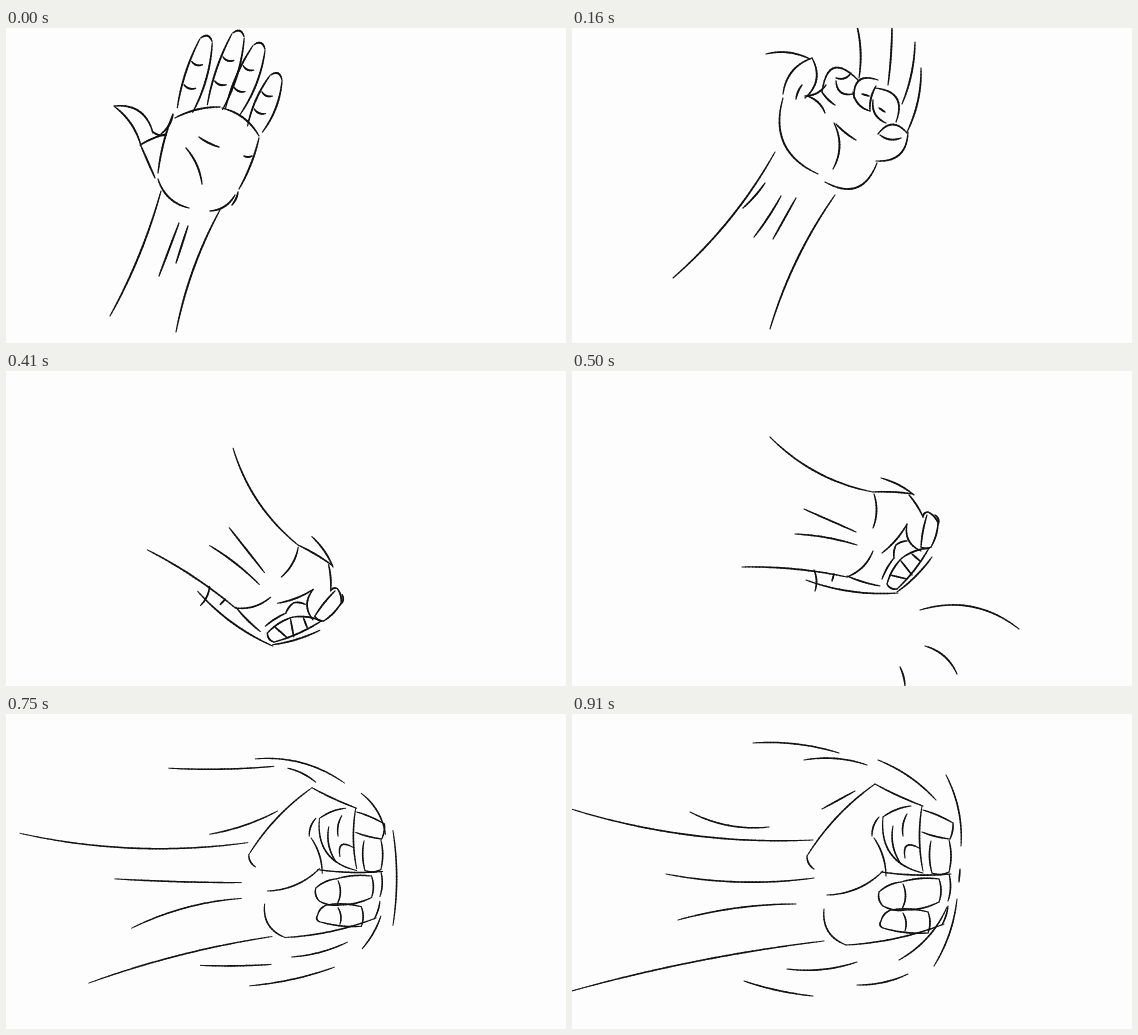
An HTML page with a canvas for the animation above (1000 ms loop, 560 by 315 pixels).

```html
<!DOCTYPE html>
<html lang="en">
<head>
<meta charset="utf-8">
<title>Punch</title>
<style>
html, body { margin: 0; width: 100%; height: 100%; overflow: hidden; background: #fdfdfd; }
canvas { display: block; width: 560px; height: 315px; }
</style>
</head>
<body>
<canvas id="stage" width="560" height="315"></canvas>
<script>
const ctx = document.getElementById('stage').getContext('2d');
const mix = (a, b, t) => a + (b - a) * t;
let weight = 1.7;

// Tapered brush stroke that bows to the left of its direction.
function arc(x1, y1, x2, y2, bow = 0) {
  const len = Math.hypot(x2 - x1, y2 - y1);
  const cx = (x1 + x2) / 2 + 2 * bow * (y2 - y1) / len;
  const cy = (y1 + y2) / 2 - 2 * bow * (x2 - x1) / len;
  const steps = Math.ceil(len / 4) + 3;
  let x = x1, y = y1;
  for (let i = 1; i <= steps; i++) {
    const t = i / steps;
    const nx = mix(mix(x1, cx, t), mix(cx, x2, t), t);
    const ny = mix(mix(y1, cy, t), mix(cy, y2, t), t);
    ctx.lineWidth = weight * (0.5 + 0.5 * Math.sqrt(Math.sin(Math.PI * (i - 0.5) / steps)));
    ctx.beginPath();
    ctx.moveTo(x, y);
    ctx.lineTo(nx, ny);
    ctx.stroke();
    [x, y] = [nx, ny];
  }
}

// Joined strokes with the same bow.
function chain(bow, ...p) {
  for (let i = 0; i + 3 < p.length; i += 2) arc(p[i], p[i + 1], p[i + 2], p[i + 3], bow);
}

// Stretched finger from base to tip, with two joint creases.
function finger(bx, by, tx, ty) {
  const len = Math.hypot(tx - bx, ty - by);
  const at = (t, side) => {
    const w = side * mix(8, 6.5, t);
    return [mix(bx, tx, t) - w * (ty - by) / len, mix(by, ty, t) + w * (tx - bx) / len];
  };
  arc(...at(0, -1), ...at(1, -1), 3);
  arc(...at(0, 1), ...at(1, 1), -4);
  arc(...at(1.02, -0.9), ...at(1.02, 0.9), 4);
  for (const t of [0.33, 0.67]) arc(...at(t, -1.1), ...at(t, 0.5), -2);
}

function openHand() {
  finger(179, 82, 200, 13);
  finger(209, 79, 232, 8);
  finger(227, 83, 253, 20);
  finger(249, 101, 270, 50);
  // thumb
  arc(108, 78, 147, 105, 10);
  arc(109, 79, 135, 118, 4);
  arc(134, 117, 160, 106, 1);
  arc(146, 103, 160, 107, -2);
  arc(167, 87, 155, 106, 2);
  // palm
  arc(135, 118, 149, 150);
  arc(167, 86, 152, 145, -2);
  arc(152, 151, 183, 180, -6);
  arc(204, 183, 229, 167, -4);
  arc(169, 90, 214, 79, 3);
  arc(216, 80, 253, 108, 5);
  arc(253, 110, 233, 161, 2);
  arc(232, 164, 226, 177, 1);
  arc(238, 128, 246, 128, -1);
  arc(193, 109, 213, 119, -1);
  arc(180, 120, 196, 156, 3);
  // arm
  arc(155, 163, 104, 288, 4);
  arc(214, 182, 170, 304, -5);
  arc(173, 195, 153, 248);
  arc(182, 198, 170, 235);
}

function curling() {
  // thumb and palm
  arc(194, 26, 238, 31, 4);
  arc(211, 66, 240, 30, 7);
  arc(240, 30, 233, 70, 8);
  arc(233, 68, 254, 57, -3);
  arc(230, 57, 224, 71, -1);
  arc(235, 68, 253, 85, 3);
  arc(211, 70, 246, 146, -18);
  arc(262, 95, 261, 141, 6);
  arc(264, 96, 284, 112, -1);
  arc(336, 104, 304, 133, 11);
  arc(305, 135, 253, 154, 16);
  // fingers
  arc(250, 64, 286, 52, 19);
  arc(264, 50, 279, 45, -3);
  arc(264, 53, 281, 66, -6);
  arc(250, 64, 263, 77, -1);
  arc(282, 70, 306, 52, 11);
  arc(281, 64, 298, 83, -4);
  arc(298, 83, 304, 58, 2);
  arc(290, 66, 297, 68);
  arc(303, 60, 324, 94, 13);
  arc(301, 72, 314, 95, -5);
  arc(307, 80, 313, 84);
  arc(306, 106, 335, 105, 9);
  arc(308, 107, 329, 110, -3);
  // trails
  arc(284, -6, 287, 50, 3);
  arc(320, -4, 316, 57, 1);
  arc(343, 14, 330, 76, 3);
  arc(349, 40, 335, 104, 4);
  // arm
  arc(203, 124, 101, 250, 7);
  arc(193, 155, 171, 180, 1);
  arc(209, 168, 182, 209, 1);
  arc(224, 170, 201, 211);
  arc(263, 167, 198, 301, -6);
}

function swing() {
  // trails
  arc(250, 122, 287, 120, 3);
  arc(285, 81, 315, 121, 4);
  arc(337, 85, 333, 126, 3);
  arc(368, 96, 354, 132, 1);
  arc(382, 121, 364, 156, 2);
  arc(390, 148, 370, 184, 2);
  arc(223, 178, 265, 131, 5);
  arc(372, 183, 358, 198, 2);
  arc(351, 211, 290, 262, 5);
  // palm
  chain(0, 287, 120, 266, 132, 255, 168, 287, 181);
  arc(287, 120, 314, 119, -3);
  arc(282, 141, 309, 137, -4);
  arc(340, 191, 369, 184, -4);
  arc(311, 150, 313, 185, 5);
  arc(288, 181, 317, 221, 3);
  arc(317, 221, 349, 193, -11);
  // fingers
  chain(0, 315, 121, 306, 113, 325, 104, 332, 114, 312, 140, 302, 145);
  chain(0, 346, 118, 333, 122, 319, 150, 327, 158, 334, 156, 355, 130, 346, 118);
  chain(0, 351, 138, 357, 138, 363, 156, 348, 172, 341, 158, 351, 138);
  chain(0, 345, 162, 362, 164, 371, 178, 369, 184, 350, 179, 341, 170);
  // arm
  arc(253, 173, 155, 237, 7);
  arc(286, 195, 220, 240, 1);
  arc(288, 212, 221, 280, 1);
  arc(317, 221, 241, 314, -3);
}

function bent() {
  // arm
  arc(198, 66, 301, 121, -9);
  arc(170, 196, 275, 206, 3);
  arc(232, 138, 284, 161);
  arc(223, 163, 285, 174, 2);
  // hand
  arc(301, 121, 341, 123, 1);
  arc(302, 123, 301, 157, 3);
  arc(309, 107, 342, 124, 2);
  arc(337, 124, 351, 146, 1);
  arc(275, 206, 301, 180, -4);
  arc(275, 205, 308, 215, -1);
  arc(234, 209, 326, 222, -5);
  arc(242, 199, 243, 220, 2);
  arc(262, 203, 260, 210);
  arc(335, 153, 349, 180, -6);
  arc(335, 153, 310, 182, 2);
  // fingers
  chain(1.5, 351, 146, 356, 141, 366, 152, 359, 176, 349, 176);
  arc(355, 144, 349, 176, -1);
  arc(363, 144, 366, 154, 2);
  chain(-1, 335, 170, 324, 174, 322, 187, 310, 208);
  chain(2, 357, 177, 325, 218, 315, 213, 330, 187, 357, 177);
  arc(340, 183, 348, 190);
  arc(329, 190, 340, 204);
  arc(318, 204, 335, 208);
  arc(360, 186, 325, 221, 2);
}

function bentTrails() {
  bent();
  arc(348, 239, 447, 258, 13);
  arc(353, 275, 385, 303, 5);
  arc(328, 296, 333, 315, 1);
}

function windUp() {
  // arm
  arc(159, 80, 273, 117, -7);
  arc(177, 133, 253, 157, -1);
  arc(167, 170, 252, 171, 4);
  arc(128, 188, 265, 211, 3);
  // hand
  arc(275, 117, 325, 90, 1);
  arc(273, 118, 267, 144, -4);
  arc(325, 91, 354, 123);
  arc(264, 172, 266, 212, -2);
  arc(266, 211, 338, 226, -6);
  arc(284, 172, 321, 150, -4);
  // thumb
  arc(333, 121, 354, 124, 3);
  arc(353, 125, 338, 160, -1);
  arc(319, 133, 334, 168, -1);
  arc(331, 158, 342, 158, 14);
  // fingers
  chain(0, 357, 123, 375, 143, 365, 161);
  chain(1, 366, 161, 360, 181, 356, 205, 332, 226);
  chain(-2, 316, 165, 302, 184, 305, 204, 333, 226);
  arc(316, 165, 366, 160, 2);
  arc(302, 184, 359, 181, 1);
  arc(300, 195, 356, 205, -3);
  arc(314, 163, 315, 182, -3);
  arc(343, 160, 342, 181, -3);
  arc(316, 184, 312, 201);
  arc(338, 181, 333, 203, -1);
  arc(327, 206, 319, 217);
  // trails
  arc(309, 79, 328, 91, 2);
  arc(354, 113, 358, 124);
  arc(373, 126, 376, 143, 2);
  arc(289, 232, 312, 235);
  arc(348, 226, 330, 237, 2);
}

function fist() {
  arc(314, 68, 246, 140, -5);
  arc(246, 140, 253, 153, -2);
  arc(314, 68, 362, 90, -1);
  arc(266, 179, 322, 155, -6);
  arc(263, 193, 285, 229, -8);
  arc(285, 229, 383, 208, -4);
  // thumb
  arc(350, 90, 322, 101, -2);
  arc(318, 101, 311, 120, -2);
  arc(322, 101, 362, 157, -15);
  arc(332, 110, 340, 148, -4);
  arc(344, 142, 358, 132, 9);
  arc(346, 98, 342, 120, -2);
  arc(313, 122, 325, 160, 3);
  // fingers
  arc(361, 90, 362, 155, -3);
  arc(320, 156, 390, 158, -2);
  chain(1, 362, 94, 392, 107, 389, 123, 361, 116);
  chain(2, 388, 124, 388, 156, 371, 157, 370, 125);
  chain(2, 318, 176, 340, 166, 378, 163, 378, 186, 345, 194, 322, 190, 318, 176);
  chain(2, 320, 205, 330, 194, 367, 196, 367, 217, 322, 212, 320, 205);
  arc(342, 168, 341, 193, 3);
  arc(342, 197, 344, 215, 2);
  arc(388, 158, 387, 185, 2);
  arc(387, 190, 381, 209, 1);
}

function punch() {
  fist();
  // arm
  arc(0, 117, 245, 127, -11);
  arc(102, 166, 238, 170, -1);
  arc(120, 219, 238, 187, 6);
  arc(74, 278, 271, 228, 5);
  // trails
  arc(160, 47, 273, 45, -2);
  arc(253, 37, 349, 63, 9);
  arc(288, 47, 318, 62, 2);
  arc(367, 74, 393, 118, 5);
  arc(401, 114, 401, 216, 4);
  arc(204, 118, 277, 93, -3);
  arc(194, 259, 270, 258, -1);
  arc(247, 281, 338, 261, -3);
  arc(292, 250, 352, 234, -3);
  arc(388, 206, 368, 241, 2);
}

function recoil() {
  ctx.save();
  ctx.translate(-11, 2);
  fist();
  ctx.restore();
  // arm
  arc(-4, 94, 241, 126, -11);
  arc(94, 160, 242, 164, -6);
  arc(106, 206, 224, 190, 4);
  arc(-4, 278, 252, 227, 5);
  // trails
  arc(181, 29, 267, 39, 4);
  arc(232, 46, 295, 51, 4);
  arc(306, 46, 364, 86, 4);
  arc(374, 61, 389, 132, 5);
  arc(118, 98, 197, 113, -6);
  arc(250, 95, 283, 77);
  arc(215, 255, 285, 248, -4);
  arc(172, 267, 241, 282, -2);
  arc(285, 271, 336, 260, -3);
  arc(327, 246, 375, 193, -6);
  arc(385, 185, 362, 252, 4);
  arc(388, 155, 387, 168);
}

const poses = [
  { at: 0, draw: openHand },
  { at: 80, draw: curling, turn: -5, x: 230, y: 150, dx: -28 },
  { at: 160, draw: curling },
  { at: 250, draw: swing },
  { at: 330, draw: swing, turn: 32, x: 210, y: 200 },
  { at: 410, draw: bent, turn: 28, x: 190, y: 130 },
  { at: 500, draw: bentTrails },
  { at: 580, draw: windUp, turn: 4, x: 200, y: 150, scale: 0.97 },
  { at: 660, draw: windUp },
  { at: 750, draw: punch, x: 200, y: 150, scale: 0.93 },
  { at: 830, draw: punch },
  { at: 910, draw: recoil }
];
let shown = null;

function show({ at, draw, turn = 0, x = 0, y = 0, dx = 0, scale = 1 }) {
  ctx.setTransform(1, 0, 0, 1, 0, 0);
  ctx.fillStyle = '#fdfdfd';
  ctx.fillRect(0, 0, 560, 315);
  ctx.translate(x + dx, y);
  ctx.rotate(turn * Math.PI / 180);
  ctx.scale(scale, scale);
  ctx.translate(-x, -y);
  ctx.strokeStyle = '#111';
  ctx.lineCap = 'round';
  weight = mix(1.9, 1.6, at / 1000);
  draw();
}

function tick() {
  const t = performance.now() % 1000;
  const pose = poses.filter(p => p.at <= t).pop();
  if (pose !== shown) show(shown = pose);
  requestAnimationFrame(tick);
}
tick();
</script>
</body>
</html>
```
